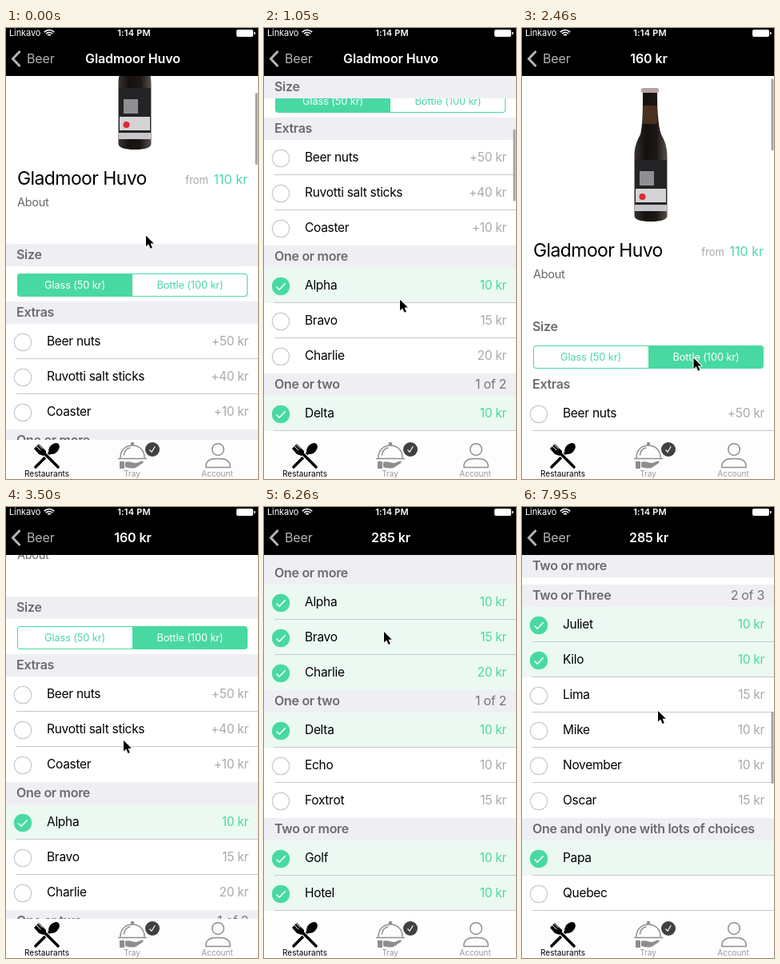
Write an HTML page with a canvas that moves like this. It is 315x564 px and loops after 8000 ms.

```html
<!DOCTYPE html>
<html lang="en">
<head>
<meta charset="utf-8">
<title>Order menu</title>
<style>
html, body { margin: 0; width: 100%; height: 100%; overflow: hidden; background: #fff; }
canvas { display: block; width: 315px; height: 564px; }
</style>
</head>
<body>
<canvas id="stage"></canvas>
<script>
const LOOP = 8000, TOP = 60, BOTTOM = 515, CONTENT = 2300;
const HEADER = 28, ROW = 44;
const GREEN = '#48d9a3', GREY = '#a9a9a9';
const PRODUCT = 'Gladmoor Huvo';
const BOTTLE_TAP = 2050;

const canvas = document.getElementById('stage');
const g = canvas.getContext('2d');
const ratio = window.devicePixelRatio || 1;
canvas.width = 315 * ratio;
canvas.height = 564 * ratio;

// Rows: name, price, time of selection (0 = from the start)
const sections = [
  { name: 'Size', rows: [], height: ROW },
  { name: 'Extras', plus: '+', rows: [['Beer nuts', 50, 4050], ['Ruvotti salt sticks', 40, 3760], ['Coaster', 10]] },
  { name: 'One or more', rows: [['Alpha', 10, 0], ['Bravo', 15, 6180], ['Charlie', 20, 5900]] },
  { name: 'One or two', note: '1 of 2', rows: [['Delta', 10, 0], ['Echo', 10], ['Foxtrot', 15]] },
  { name: 'Two or more', rows: [['Golf', 10, 0], ['Hotel', 10, 0], ['India', 15]] },
  { name: 'Two or Three', note: '2 of 3', rows: [['Juliet', 10, 0], ['Kilo', 10, 0], ['Lima', 15],
    ['Mike', 10], ['November', 10], ['Oscar', 15]] },
  { name: 'One and only one with lots of choices', rows: [['Papa', 0, 0], ['Quebec', 0], ['Romeo', 0]] }
];
let nextTop = 361;
for (const s of sections) {
  s.top = nextTop;
  nextTop += HEADER + (s.height || s.rows.length * ROW);
  s.end = nextTop;
}

// Each flick: start, end, where the page comes to rest
const flicks = [[-1, 820, 530], [880, 1650, 0], [2460, 3140, 249], [4540, 4760, 387],
  [4940, 5680, 524], [6610, 7370, 820], [7430, 7950, 976]];

// Pointer stops: arrival time, x, y; each is reached by a short glide
const GLIDE = 220;
const stops = [[0, 175, 260], [220, 172, 110], [860, 170, 182], [1050, 170, 338], [1250, 168, 420], [2000, 215, 413],
  [2680, 165, 270], [3500, 147, 291], [4050, 150, 232], [4360, 178, 357], [4760, 180, 219], [5160, 178, 120],
  [5800, 150, 203], [6180, 150, 155], [6500, 156, 205], [6830, 162, 40], [7300, 168, 409], [7650, 170, 290], [7950, 170, 254]];

const clamp = v => Math.min(1, Math.max(0, v));
const easeOut = p => 1 - (1 - clamp(p)) ** 2;

function scrollAt(t) {
  let s = 89;
  for (const [start, end, to] of flicks) s += (to - s) * easeOut((t - start) / (end - start));
  return Math.round(s);
}

function cursorAt(t) {
  let [last, x, y] = stops[0];
  for (const [time, toX, toY] of stops.slice(1)) {
    const start = Math.max(last, time - GLIDE);
    const p = easeOut((t - start) / (time - start));
    x += (toX - x) * p;
    y += (toY - y) * p;
    last = time;
  }
  return [x, y];
}

function titleAt(t) {
  if (t < BOTTLE_TAP) return PRODUCT;
  const chosen = sections.flatMap(s => s.rows).filter(row => t >= row[2]);
  return chosen.reduce((sum, row) => sum + row[1], 100) + ' kr';
}

function text(str, x, y, size, color, { align = 'left', weight = 400, gap = -0.3 } = {}) {
  g.font = `${weight} ${size}px Inter, Roboto, sans-serif`;
  g.letterSpacing = gap + 'px';
  g.textAlign = align;
  g.fillStyle = color;
  g.fillText(str, x, y);
}

function rect(x, y, w, h, color, r = 0) {
  g.beginPath();
  g.roundRect(x, y, w, h, r);
  g.fillStyle = color;
  g.fill();
}

function disc(x, y, r, color) {
  g.beginPath();
  g.arc(x, y, r, 0, 7);
  g.fillStyle = color;
  g.fill();
}

function fill(d, color) {
  g.fillStyle = color;
  g.fill(new Path2D(d));
}

function stroke(d, color, width) {
  g.strokeStyle = color;
  g.lineWidth = width;
  g.stroke(new Path2D(d));
}

function drawBottle() {
  const shade = g.createLinearGradient(140, 0, 182, 0);
  ['#3a3431', '#15110f', '#1d1715', '#5a524e'].forEach((c, i) => shade.addColorStop(i / 3, c));
  fill('M151 80H169C169 104 170 122 174 134C180 145 181.5 152 181.5 162V236Q181 243 161 243Q141 243 140.5 236V162C140.5 152 142 145 148 134C151 122 151 104 151 80Z', shade);
  rect(151, 98, 18, 23, '#49301f');
  rect(149, 76, 22, 6, '#b7a3a5', 2);
  rect(141, 166, 40, 64, '#242427');
  rect(147, 180, 18, 18, '#8f8e91');
  rect(142, 202, 38, 17, '#d4d3d5');
  rect(141, 222, 40, 8, '#c8c6c8');
  disc(150.5, 212, 4, '#d92b33');
}

function drawSizes(y, t) {
  const bottle = t >= BOTTLE_TAP;
  const opt = { align: 'center', gap: -0.1 };
  rect(14, y, 288, 29, GREEN, 4);
  rect(bottle ? 15 : 158, y + 1, 143, 27, '#fff', bottle ? [3, 0, 0, 3] : [0, 3, 3, 0]);
  text('Glass (50 kr)', 86, y + 18.5, 12.8, bottle ? GREEN : '#fff', opt);
  text('Bottle (100 kr)', 230, y + 18.5, 12.8, bottle ? '#fff' : GREEN, opt);
}

function drawRow([name, price, at], y, plus, last, t) {
  const on = t >= at;
  if (on) rect(0, y, 315, ROW, '#ebf9f2');
  if (!last) rect(13, y + 43, 302, 1, '#c8c7cc');
  disc(21, y + 23, 11.2, on ? GREEN : '#c4c4c6');
  if (on) stroke(`M15.5 ${y + 23.5}l3.7 3.7l7.5 -8`, '#fff', 1.5);
  else disc(21, y + 23, 10.2, '#fff');
  text(name, 51, y + 27, 15.5, '#000');
  if (price) text(`${plus}${price} kr`, 303, y + 27, 15.5, on ? GREEN : GREY, { align: 'right' });
}

function drawPage(s, t) {
  rect(0, 0, 315, 564, '#fff');
  g.save();
  g.translate(0, -s);
  drawBottle();
  text(PRODUCT, 14, 286.5, 23, '#000', { gap: -0.6 });
  text('About', 14, 313.5, 14.5, '#666');
  text('from', 253, 286, 13, GREY, { align: 'right', gap: 0 });
  text('110 kr', 302, 286, 16, GREEN, { align: 'right', gap: 0 });
  drawSizes(398, t);
  for (const { rows, top, plus = '' } of sections)
    rows.forEach((row, i) => drawRow(row, top + HEADER + i * ROW, plus, i === rows.length - 1, t));
  g.restore();

  const pale = t > 1500 && t < 2500;
  for (const { name, note, top, end } of sections) {
    const y = Math.min(Math.max(TOP, top - s), end - HEADER - s);
    rect(0, y, 315, HEADER, pale ? '#fff' : '#efeff3');
    text(name, 13, y + 19, 16, '#6b6b6e', { weight: 600 });
    if (note) text(note, 303, y + 19, 16, '#77777a', { align: 'right' });
  }
}

function drawThumb(s, t) {
  const view = BOTTOM - TOP;
  g.globalAlpha = Math.max(...flicks.map(([start, end]) => t > start ? clamp(2 - (t - end) / 180) : 0));
  rect(311.5, TOP + 3 + s * view / CONTENT, 3, view * view / CONTENT, '#a3a3a6', 1.5);
  g.globalAlpha = 1;
}

function drawNav(t) {
  rect(0, 0, 315, TOP, '#000');
  text('Linkavo', 4, 10, 11, '#fff', { gap: -0.1 });
  for (const r of [2.5, 5.5, 8.5]) {
    g.beginPath();
    g.arc(54, 11, r, -Math.PI * 0.76, -Math.PI * 0.24);
    g.strokeStyle = '#fff';
    g.lineWidth = 1.7;
    g.stroke();
  }
  text('1:14 PM', 160, 10, 11, '#fff', { align: 'center', weight: 600, gap: 0.2 });
  rect(288, 2, 21, 9, '#fff', 2);
  rect(310, 5, 1.5, 3, '#fff');
  stroke('M17.5 29L8.5 38.5L17.5 48', '#b4b4b4', 3);
  text('Beer', 26, 44, 16, '#b4b4b4', { gap: -0.1 });
  text(titleAt(t), 158.5, 44, 16, '#fff', { align: 'center', weight: 600, gap: -0.1 });
}

function drawTabs() {
  const line = '#8e8e8e';
  rect(0, BOTTOM, 315, 49, '#fdfdfd');
  g.lineCap = 'round';
  // Fork and spoon
  stroke('M37 549L55 531', '#000', 3.6);
  g.beginPath();
  g.ellipse(60, 526, 5.5, 8, Math.PI / 4, 0, 7);
  g.fillStyle = '#000';
  g.fill();
  stroke('M46 530L65 549', '#fdfdfd', 6);
  stroke('M46 530L65 549', '#000', 3.6);
  fill('M35 526L41 520L50 529L50 533L47 535L41 533Z', '#000');
  stroke('M37.5 522.5L43 528M40 520.5L45.5 526', '#fdfdfd', 1);
  // Cloche on a hand
  stroke('M143 537C143 517 173 517 173 537M140.5 538.5H175.5M147.5 534C148 529 151 526 155 525', line, 1.5);
  disc(158, 520, 2.2, line);
  fill('M142 542H148V551H142ZM149 543C154 541 157 544 163 544L170 541.5Q173 542 171 544L162 550Q156 551.5 149 549Z', line);
  // Person
  stroke('M257.7 527a7.3 7.3 0 1 1 14.6 0a7.3 7.3 0 1 1 -14.6 0ZM250 549.5C249 541 255 538.5 265 538.5S281 541 280 549.5Z', line, 1.5);
  g.lineCap = 'butt';
  disc(183, 527, 9, '#414141');
  stroke('M179.5 527.5l2.5 2.8l4.3 -7', '#fff', 1.2);
  ['Restaurants', 'Tray', 'Account'].forEach((label, i) =>
    text(label, 51 + i * 106.5, 560.5, 10, i ? '#999' : '#000', { align: 'center', gap: 0 }));
}

function drawCursor([x, y]) {
  const arrow = 'M0 0V13.5L3.2 10.6L5.6 16L7.8 15L5.6 9.8H9.8Z';
  g.save();
  g.translate(x, y + 1);
  g.lineJoin = 'round';
  stroke(arrow, '#fff', 2);
  fill(arrow, '#000');
  g.restore();
}

function frame(now) {
  const t = now % LOOP, s = scrollAt(t);
  g.setTransform(ratio, 0, 0, ratio, 0, 0);
  drawPage(s, t);
  drawThumb(s, t);
  drawNav(t);
  drawTabs();
  drawCursor(cursorAt(t));
  requestAnimationFrame(frame);
}
requestAnimationFrame(frame);
</script>
</body>
</html>
```
